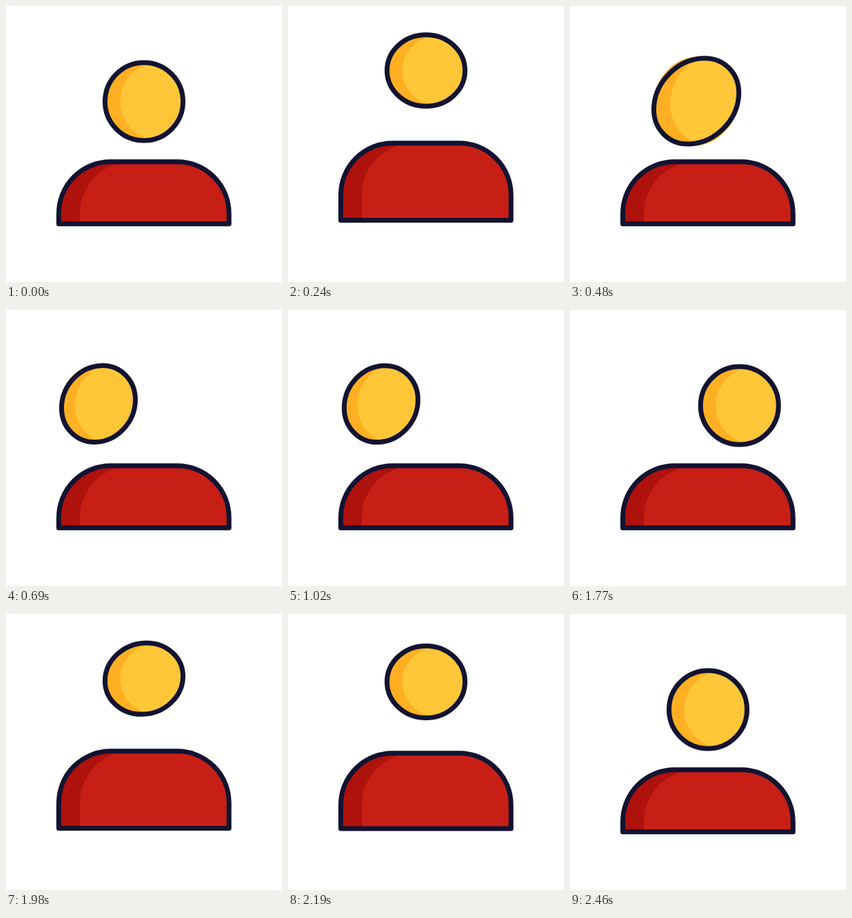
These frames come from a looping animation (400x400 px, 3520 ms). An HTML page with a canvas:

```html
<!DOCTYPE html>
<html lang="en">
<head>
<meta charset="utf-8">
<title>Avatar looking around</title>
<style>
  html, body { margin: 0; width: 100%; height: 100%; overflow: hidden; background: #fff; }
  canvas { display: block; width: 400px; height: 400px; }
</style>
</head>
<body>
<canvas id="stage"></canvas>
<script>
const LOOP = 3520, STEP = 30, RADIUS = 56.5;
const NAVY = '#121331', YELLOW = '#ffc738', ORANGE = '#ffaf22', RED = '#c71f16', DARK_RED = '#af110d';

const canvas = document.getElementById('stage');
const ctx = canvas.getContext('2d');
const ratio = window.devicePixelRatio || 1;
canvas.width = canvas.height = 400 * ratio;

const progress = (time, start, end) => Math.min(1, Math.max(0, (time - start) / (end - start)));

// Ease in and out from 0 to 1
function ramp(time, start, end, power = 5) {
  const u = progress(time, start, end);
  return u < .5 ? (2 * u) ** power / 2 : 1 - (2 - 2 * u) ** power / 2;
}

// Swell from 0 to 1 and back
const bump = (time, start, end) => Math.sin(Math.PI * progress(time, start, end));

function pose(time) {
  const hop = ramp(time, 30, 240, 3) - ramp(time, 270, 450, 3)
    + ramp(time, 1770, 2000, 3) - ramp(time, 2100, 2400, 3);
  const crossing = ramp(time, 930, 1350);
  const left = ramp(time, 410, 570) - crossing;
  const right = crossing - ramp(time, 1620, 2000);
  const lean = crossing - ramp(time, 1560, 1770);
  const stretch = bump(time, 400, 570);
  return {
    lift: -27 * hop,
    lag: -1.5 * (left + lean),
    x: 200 - 66 * left + 54 * right,
    y: 138.5 - 2.5 * left + 12 * lean - 45 * hop,
    scaleX: 1 - .055 * (left + lean) + .1 * stretch,
    scaleY: 1 - .02 * left - .085 * hop + .1 * stretch,
    shear: .03 * lean - .05 * left - .09 * stretch - .037 * bump(time, 1770, 2070)
  };
}

function ball({ x, y, scaleX, scaleY, shear }, shift = 0) {
  const circle = new Path2D(), path = new Path2D();
  circle.arc(shift, 0, RADIUS, 0, Math.PI * 2);
  path.addPath(circle, new DOMMatrix([scaleX, shear, shear, scaleY, x, y]));
  return path;
}

function shoulders(lift, shift = 0) {
  const top = 225.8 + lift, bottom = 315.8 + lift * .2, left = 76.5 + shift;
  return new Path2D(`M${left} ${bottom}V${top + 75}a75 75 0 0 1 75-75H248.2a75 75 0 0 1 75 75V${bottom}Z`);
}

// Base colour with a lighter copy, moved right, clipped inside it
function shaded(base, light, baseColor, lightColor) {
  ctx.fillStyle = baseColor;
  ctx.fill(base);
  ctx.save();
  ctx.clip(base);
  ctx.fillStyle = lightColor;
  ctx.fill(light);
  ctx.restore();
}

function outline(path) {
  ctx.strokeStyle = NAVY;
  ctx.lineWidth = 7;
  ctx.lineJoin = 'round';
  ctx.stroke(path);
}

function draw(time) {
  ctx.setTransform(ratio, 0, 0, ratio, 0, 0);
  ctx.fillStyle = '#fff';
  ctx.fillRect(0, 0, 400, 400);

  const head = pose(time);
  const body = shoulders(head.lift);
  shaded(body, shoulders(head.lift, 30.5), DARK_RED, RED);
  outline(body);

  // The fill shears less than its outline and trails behind it
  const face = {
    ...head,
    x: head.x + head.lag,
    scaleY: head.scaleY + Math.abs(head.shear) / 2,
    shear: head.shear * .35
  };
  shaded(ball(face), ball(face, 22), ORANGE, YELLOW);
  outline(ball(head));
}

const begin = performance.now();
function tick() {
  const time = (performance.now() - begin) % LOOP;
  draw(Math.floor(time / STEP) * STEP);
  requestAnimationFrame(tick);
}
tick();
</script>
</body>
</html>
```
